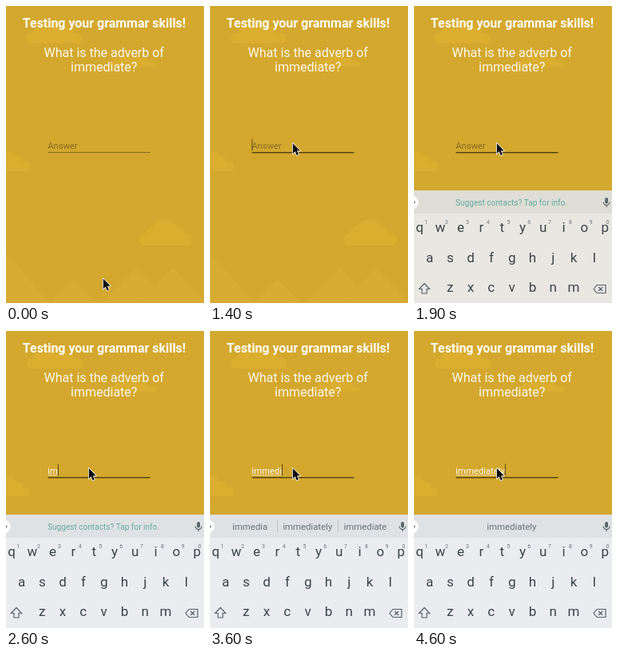
Recreate the animation shown at these times as an HTML page with a canvas. Size 248x372 px, loop 4.8 s.

```html
<!DOCTYPE html>
<html lang="en">
<head>
<meta charset="utf-8">
<title>Grammar quiz</title>
<style>
  html, body { margin: 0; width: 100%; height: 100%; overflow: hidden; background: #d4a82e; }
  canvas { display: block; width: 248px; height: 372px; }
</style>
</head>
<body>
<canvas id="stage"></canvas>
<script>
const W = 248, H = 372, LOOP = 4800, STEP = 100;
const canvas = document.getElementById('stage');
const ctx = canvas.getContext('2d');
const ratio = window.devicePixelRatio || 1;
canvas.width = W * ratio;
canvas.height = H * ratio;
ctx.scale(ratio, ratio);

const INK = '#3b4448', GREY = '#687278', CLOUD = '#dbae30', HILL = '#d8ac33';

// [start time, typed text]
const TYPING = [
  [0, ''], [2300, 'i'], [2600, 'im'], [2900, 'imm'], [3200, 'imme'], [3400, 'immed'],
  [3600, 'immedi'], [3800, 'immedia'], [4200, 'immediat'], [4300, 'immediate'],
  [4500, 'immediatel'], [4600, 'immediately']
];

// [start time, words in the suggestion strip]
const STRIP = [
  [0, []],
  [2900, ['imm', 'mom', "I'm"]],
  [3200, ['imme', 'immediately', 'immediate']],
  [3400, ['immed', 'immediately', 'immediate']],
  [3600, ['immedia', 'immediately', 'immediate']],
  [3900, ['immediat', 'immediate', 'immediately']],
  [4300, ['immediate', 'immediately', 'immediate']],
  [4500, ['immediately']]
];

const clamp = v => Math.max(0, Math.min(1, v));
const smooth = v => v * v * (3 - 2 * v);
const mix = (a, b, v) => a + (b - a) * v;
const at = (list, t) => list.filter(item => item[0] <= t).pop()[1];

function text(s, x, y, size, color, align = 'center', weight = 400) {
  ctx.font = `${weight} ${size}px Roboto, sans-serif`;
  ctx.textAlign = align;
  ctx.fillStyle = color;
  ctx.fillText(s, x, y);
}

function rect(x, y, w, h, color) {
  ctx.fillStyle = color;
  ctx.fillRect(x, y, w, h);
}

function shape(points, close = true) {
  ctx.beginPath();
  points.forEach(([x, y]) => ctx.lineTo(x, y));
  if (close) ctx.closePath();
}

function cloud(x, y, w, h) {
  ctx.fillStyle = CLOUD;
  ctx.beginPath();
  ctx.roundRect(x, y + h * 0.55, w, h * 0.45, h * 0.22);
  ctx.roundRect(x + w * 0.12, y + h * 0.25, w * 0.72, h * 0.6, h * 0.3);
  ctx.roundRect(x + w * 0.27, y, w * 0.42, h * 0.7, h * 0.35);
  ctx.fill();
}

function mountain(x, y, half) {
  ctx.fillStyle = HILL;
  shape([[x - half, H], [x, y], [x + half, H]]);
  ctx.fill();
}

function background() {
  rect(0, 0, W, H, '#d4a82e');
  cloud(26, 18, 70, 29);
  cloud(128, 62, 60, 14);
  cloud(-28, 182, 58, 25);
  cloud(167, 268, 67, 32);
  mountain(-8, 302, 64);
  mountain(84, 341, 30);
  mountain(162, 328, 42);
  mountain(209, 328, 42);
}

function question() {
  text('Testing your grammar skills!', 123, 26.9, 15.95, '#fffdf8', 'center', 700);
  text('What is the adverb of', 122.7, 63.8, 16, '#fcf7ea');
  text('immediate?', 122.7, 81.8, 16, '#fcf7ea');
}

function field(t) {
  const typed = at(TYPING, t);
  const focus = clamp((t - 1200) / 200);
  const width = typed ? (ctx.font = '11.3px Roboto, sans-serif', ctx.measureText(typed).width) : 0;
  if (typed) {
    text(typed, 52.3, 178.8, 11.3, '#fcf7ea', 'left');
    rect(52.3, 180.2, width, 0.8, '#f3e6c6');
  } else {
    text('Answer', 52.2, 178.7, 11.2, '#876b22', 'left');
  }
  rect(52.5, 182.9, 128, mix(0.9, 1.4, focus), `rgba(60,45,10,${mix(0.6, 0.85, focus)})`);
  const blinkedOff = t >= 1900 && t < 2300;
  if (t >= 1300 && !blinkedOff) rect(52.3 + width, 166.5, 1, 15, '#5c4815');
}

function icons() {
  ctx.strokeStyle = '#57636a';
  ctx.lineWidth = 1.2;
  // shift
  shape([[13, 346.5], [19.5, 353.5], [16, 353.5], [16, 359], [10, 359], [10, 353.5], [6.5, 353.5]]);
  ctx.stroke();
  // backspace
  shape([[225, 353.5], [229, 348.5], [240, 348.5], [240, 358.5], [229, 358.5]]);
  ctx.stroke();
  shape([[231.2, 351], [236.2, 356]], false);
  ctx.stroke();
  shape([[236.2, 351], [231.2, 356]], false);
  ctx.stroke();
  // expand button
  ctx.fillStyle = '#fff';
  ctx.beginPath();
  ctx.arc(-3, 245, 8.5, 0, 7);
  ctx.fill();
  shape([[-1.5, 242.5], [1, 245], [-1.5, 247.5]], false);
  ctx.stroke();
  // microphone
  ctx.fillStyle = '#57636a';
  ctx.beginPath();
  ctx.roundRect(239.2, 239, 3.8, 7.5, 1.9);
  ctx.fill();
  ctx.beginPath();
  ctx.arc(241.1, 244.6, 3.9, 0, Math.PI);
  ctx.moveTo(241.1, 248.5);
  ctx.lineTo(241.1, 251);
  ctx.stroke();
}

function suggestions(t) {
  const words = at(STRIP, t);
  if (!words.length) {
    text('Suggest contacts? Tap for info.', 122, 248.8, 10.1, '#68aaa2');
  } else if (words.length === 1) {
    text(words[0], 122.3, 248.8, 11.4, GREY);
  } else {
    words.forEach((word, i) => text(word, 50 + i * 72.2, 248.8, 11.4, GREY));
    rect(84, 237, 1, 15, '#bcc3c7');
    rect(160, 237, 1, 15, '#bcc3c7');
  }
}

function keyboard(t) {
  if (t < 1800) return;
  const first = t < 1900, second = t < 2000;
  ctx.save();
  ctx.globalAlpha = first ? 0.68 : second ? 0.93 : 1;
  ctx.translate(0, first ? 16.5 : second ? 1 : 0);
  rect(0, 230, W, 29, '#dfe2e4');
  rect(0, 259, W, H - 259, '#ebecef');
  ctx.globalAlpha = first ? 0.88 : 1;
  const row = (keys, x, y) =>
    [...keys].forEach((key, i) => text(key, x + i * 25.8, y, 17, INK));
  row('qwertyuiop', 7, 282);
  row('asdfghjkl', 19.5, 319.5);
  row('zxcvbnm', 45.2, 357);
  [...'1234567890'].forEach((digit, i) =>
    text(digit, Math.min(15.2 + i * 25.8, 242.5), 271.7, 6.8, '#68757c'));
  icons();
  suggestions(t);
  ctx.restore();
}

function pointer(t) {
  const travel = smooth(clamp((t - 100) / 600));
  const settle = clamp((t - 700) / 300);
  ctx.save();
  ctx.translate(mix(121.8, 103, travel) + settle * 0.8, mix(341.5, 173.5, travel) - settle * 1.5);
  ctx.scale(0.8, 0.85);
  shape([[0, 0], [0, 15.2], [3.5, 11.9], [6, 17.6], [8.8, 16.4], [6.3, 10.9], [11.2, 10.9]]);
  ctx.lineJoin = 'round';
  ctx.lineWidth = 2;
  ctx.strokeStyle = '#fff';
  ctx.stroke();
  ctx.fillStyle = '#080808';
  ctx.fill();
  ctx.restore();
}

function draw(now) {
  const t = Math.floor((now % LOOP) / STEP) * STEP;
  background();
  question();
  field(t);
  keyboard(t);
  pointer(t);
}

const start = performance.now();
function tick() {
  draw(performance.now() - start);
  requestAnimationFrame(tick);
}
tick();
</script>
</body>
</html>
```
